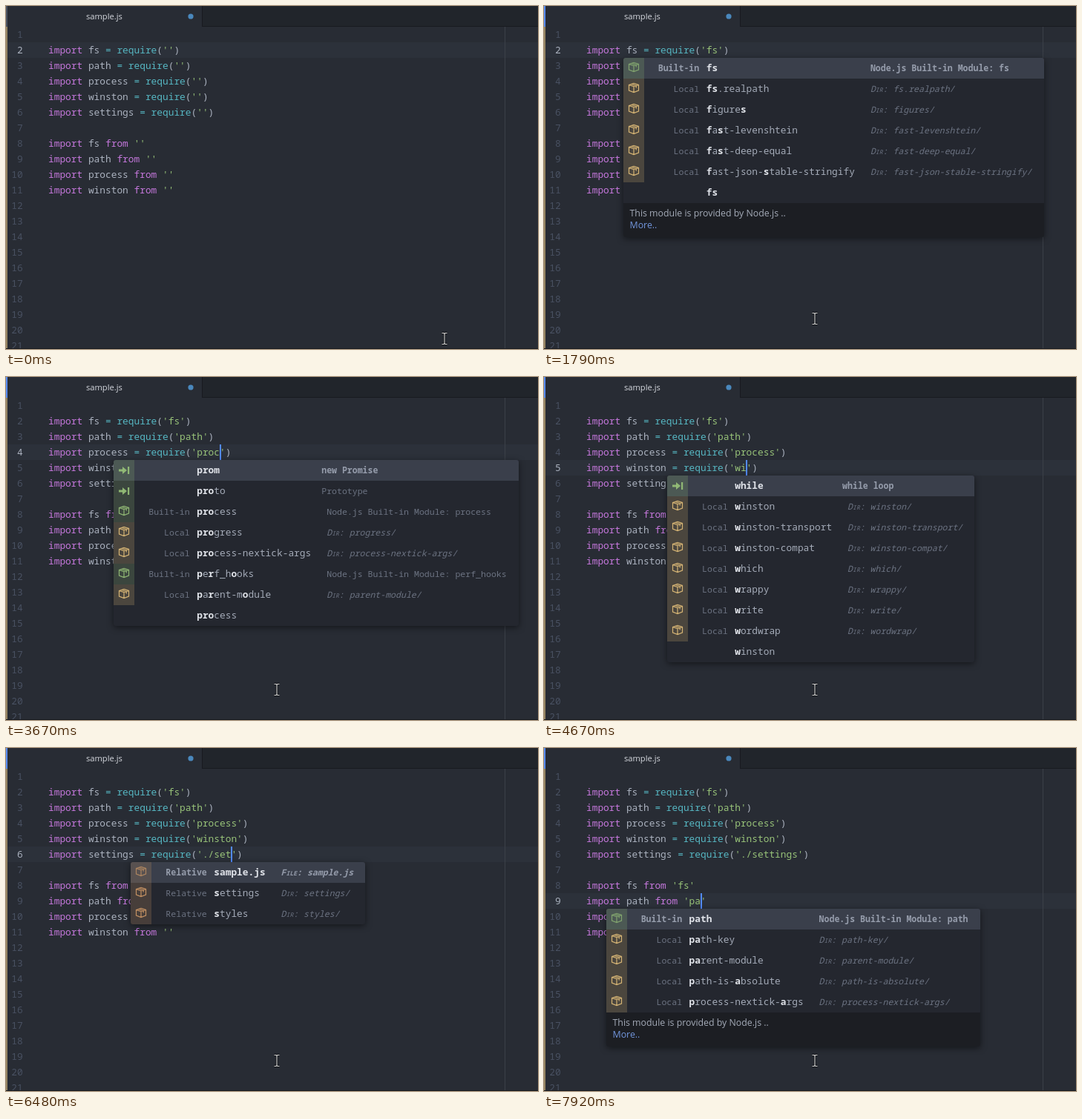
Write an HTML page with a canvas that moves like this. It is 717 px wide and 463 px high and loops after 8 s.

```html
<!DOCTYPE html>
<html lang="en">
<head>
<meta charset="utf-8">
<title>Editor autocomplete</title>
<style>
html, body { margin: 0; width: 100%; height: 100%; overflow: hidden; background: #282c34; }
canvas { display: block; }
</style>
</head>
<body>
<canvas id="stage" width="717" height="463"></canvas>
<script>
const ctx = document.getElementById('stage').getContext('2d');
const LOOP = 8000, CHAR = 7.7, SMALL = 6.93, LINE = 21, ROW = 28, CODE_X = 57;

const mono = (advance, style = '') => `${style} ${advance / 0.6}px "Noto Sans Mono", monospace`;
const sans = size => `${size}px "Open Sans", sans-serif`;

const modules = ['fs', 'path', 'process', 'winston', 'settings'];
const lineTop = n => 28 + (n - 1) * LINE;

// Each line: tokens before the quoted string, and what closes it
const code = {};
modules.forEach((name, i) => {
  code[i + 2] = {
    tokens: [['import ', '#c678dd'], [name + ' ', '#abb2bf'], ['= require', '#56b6c2'], ['(', '#abb2bf']],
    close: ')'
  };
  if (i < 4) code[i + 8] = {
    tokens: [['import ', '#c678dd'], [name + ' ', '#abb2bf'], ['from ', '#c678dd']],
    close: ''
  };
});
const stringStart = n => code[n].tokens.reduce((sum, [s]) => sum + s.length, 1);

// Suggestions: s snippet, b built-in, l local, r relative, w plain word
const suggestions = {
  'f': 's:f=Anonymous Function|s:fix=fixme|s:for=for|s:forin=for in|s:forof=for of|s:fun=Function|b:fs|l:fecha|l:flatted|l:figures|l:flat-cache',
  'fs': 'b:fs|l:fs.realpath|l:figures|l:fast-levenshtein|l:fast-deep-equal|l:fast-json-stable-stringify|w:fs',
  'p': 's:prom=new Promise|s:proto=Prototype|b:path|b:process|b:punycode|l:pump|l:pify|l:path-key|l:progress|l:path-exists|l:pinkie',
  'pa': 'b:path|l:path-key|l:parent-module|l:path-is-absolute|l:process-nextick-args',
  'pat': 'b:path|l:path-key|l:path-is-absolute|l:parent-module',
  'path': 'b:path|l:path-key|l:path-is-absolute',
  'pro': 's:prom=new Promise|s:proto=Prototype|b:process|l:progress|l:process-nextick-args|b:perf_hooks|l:parent-module|w:process',
  'proc': 'b:process|l:process-nextick-args|w:process',
  'w': 's:while=while loop|l:winston|l:winston-transport|l:winston-compat|l:which|l:wrappy|l:write|l:wordwrap|w:winston',
  'wi': 'l:winston|l:winston-transport|l:winston-compat|l:which|l:write|w:winston',
  'wins': 'l:winston|l:winston-transport|l:winston-compat|w:winston',
  '.': 'r:..',
  '/': 'r:modules|r:sample.js|r:settings|r:styles',
  's': 'r:sample.js|r:settings|r:styles',
  'set': 'r:settings|w:settings'
};
const descriptions = {
  b: ['This module is provided by Node.js ..', 'More..'],
  r: ['D:\\desarollo\\github\\tolverna\\atom-', 'path-intellisense\\assets']
};
const labels = { s: '', b: 'Built-in', l: 'Local', r: 'Relative', w: '' };
const tints = { s: '#98c379', b: '#98c379', l: '#e5c07b', r: '#d19a66' };

// time, line, typed string, open suggestion list
const steps = [
  [0, 2, ''], [1340, 2, 'f'], [1400, 2, 'f', 'f'], [1470, 2, 'fs', 'f'], [1540, 2, 'fs', 'fs'], [1950, 2, 'fs'],
  [2100, 3, ''], [2200, 3, 'p'], [2290, 3, 'p', 'p'], [2440, 3, 'pa', 'p'], [2500, 3, 'pa', 'pa'],
  [2580, 3, 'pat', 'pat'], [2750, 3, 'path', 'pat'], [2820, 3, 'path', 'path'], [3000, 3, 'path'],
  [3290, 4, ''], [3360, 4, 'p'], [3440, 4, 'pr', 'p'], [3670, 4, 'proc', 'pro'], [3820, 4, 'proc', 'proc'],
  [3980, 4, 'process'],
  [4360, 5, ''], [4440, 5, 'w'], [4520, 5, 'w', 'w'], [4670, 5, 'wi', 'w'], [4740, 5, 'win', 'wi'],
  [4820, 5, 'wins', 'wi'], [4900, 5, 'wins', 'wins'], [5300, 5, 'winston'],
  [5540, 6, ''], [5610, 6, '.'], [5680, 6, '.', '.'], [5910, 6, './', '/'], [6150, 6, './s', '/'],
  [6230, 6, './s', 's'], [6310, 6, './se', 's'], [6480, 6, './set', 's'], [6540, 6, './set', 'set'],
  [6920, 6, './settings'],
  [6990, 8, ''], [7070, 8, 'f', 'f'], [7150, 8, 'fs', 'fs'], [7340, 8, 'fs'],
  [7720, 9, ''], [7780, 9, 'p'], [7850, 9, 'p', 'p'], [7920, 9, 'pa', 'pa']
];
const blinks = [[1790, 1950], [5150, 5300], [6710, 6920]];
const mousePath = [
  [70, 591, 449], [240, 520, 350], [440, 350, 190], [640, 228, 88], [750, 199, 62], [840, 218, 57],
  [1090, 218, 57], [1200, 262, 160], [1320, 335, 350], [1450, 365, 422]
];

function rect(x, y, w, h, color) {
  ctx.fillStyle = color;
  ctx.fillRect(x, y, w, h);
}

function text(str, x, y, color, font) {
  ctx.font = font;
  ctx.fillStyle = color;
  ctx.fillText(str, x, y);
}

function stroke(points, color, width) {
  ctx.beginPath();
  points.forEach(line => line.forEach(([x, y], i) => i ? ctx.lineTo(x, y) : ctx.moveTo(x, y)));
  ctx.strokeStyle = color;
  ctx.lineWidth = width;
  ctx.stroke();
}

function polygon(points, color) {
  ctx.beginPath();
  points.forEach(([x, y]) => ctx.lineTo(x, y));
  ctx.closePath();
  ctx.fillStyle = color;
  ctx.fill();
}

function drawFrame(focused) {
  rect(0, 0, 717, 463, '#282c34');
  rect(264, 0, 453, 27, '#21252b');
  rect(264, 0, 1, 28, '#181a1f');
  rect(264, 27, 453, 1, '#181a1f');
  rect(0, 0, 2, 28, focused ? '#568af2' : '#4b5260');
  text('sample.js', 108, 18, '#d7dae0', sans(11.15));
  ctx.beginPath();
  ctx.arc(249, 14, 3.6, 0, 7);
  ctx.fillStyle = '#4a88bd';
  ctx.fill();
}

function drawCode(activeLine, strings) {
  rect(2, lineTop(activeLine), 715, LINE, '#2c313a');
  rect(672, 28, 1, 435, '#3b4048');
  rect(0, 28, 2, 435, '#948360');
  for (let n = 1; n <= 21; n++) {
    const y = lineTop(n) + 15, num = String(n);
    text(num, 22.6 - num.length * CHAR, y, n === activeLine ? '#abb2bf' : '#495162', mono(CHAR));
    if (!code[n]) continue;
    let x = CODE_X;
    const quoted = `'${strings[n] || ''}'`;
    for (const [str, color] of [...code[n].tokens, [quoted, '#98c379'], [code[n].close, '#abb2bf']]) {
      text(str, x, y, color, mono(CHAR));
      x += str.length * CHAR;
    }
  }
  rect(0, 462, 717, 1, '#181a1f');
}

function drawIcon(type, x, y) {
  const color = tints[type];
  if (type === 's') {
    rect(x - 7, y - 1.5, 6, 3, color);
    polygon([[x - 2, y - 5], [x + 4, y], [x - 2, y + 5]], color);
    rect(x + 5, y - 5, 2.2, 10, color);
    return;
  }
  stroke([
    [[x - 6.5, y - 4], [x, y - 6], [x + 6.5, y - 4], [x + 6.5, y + 3.5], [x, y + 6], [x - 6.5, y + 3.5], [x - 6.5, y - 4], [x, y - 2], [x + 6.5, y - 4]],
    [[x, y - 2], [x, y + 6]],
    [[x - 3.2, y - 5], [x + 3.2, y - 3], [x + 3.2, y]]
  ], color, 1.2);
}

// Indexes of matched letters; a letter that starts a later word wins
function matches(word, query) {
  const found = new Set();
  let from = 0;
  for (const ch of query) {
    const wordStart = word.indexOf('-' + ch, from);
    const at = wordStart >= 0 ? wordStart + 1 : word.indexOf(ch, from);
    if (at < 0) break;
    found.add(at);
    from = at + 1;
  }
  return found;
}

function parse(entry) {
  const type = entry[0], [word, note] = entry.slice(2).split('=');
  const file = /\w\./.test(word);
  const kind = type === 'r' && file ? 'File' : type === 'l' || type === 'r' ? 'Dir' : '';
  const detail = type === 's' ? note : type === 'b' ? 'Node.js Built-in Module: ' + word
    : kind ? ': ' + word + (kind === 'Dir' ? '/' : '') : '';
  const kindWidth = kind && SMALL * (1 + 0.7 * (kind.length - 1));
  return { type, word, kind, detail, kindWidth, width: detail.length * SMALL + (kindWidth || 0) };
}

function drawDetail(row, x, y, color, weight) {
  if (row.kind) {
    const style = 'italic ' + weight;
    text(row.kind[0], x, y, color, mono(SMALL, style));
    text(row.kind.slice(1).toUpperCase(), x + SMALL, y, color, mono(SMALL * 0.7, style));
    text(row.detail, x + row.kindWidth, y, color, mono(SMALL, style));
  } else text(row.detail, x, y, color, mono(SMALL, weight));
}

function drawPopup(key, wordX, top) {
  const rows = suggestions[key].split('|').map(parse);
  const max = fn => Math.max(...rows.map(fn));
  const scrolls = rows.length > 10;
  const detailX = wordX + max(r => r.word.length) * CHAR + 21;
  let offset = 56.6 + max(r => labels[r.type].length) * SMALL;
  const natural = detailX - wordX + offset + max(r => r.width) + 16;
  offset += Math.max(0, 243 - natural) * 0.55;
  const left = Math.round(wordX - offset);
  const width = Math.round(Math.max(243, natural)) + (scrolls ? 12 : 0);
  const listHeight = Math.min(rows.length, 10) * ROW;
  const about = rows[0].type === 'b' || key === '.' ? descriptions[rows[0].type] : null;
  const aboutHeight = about ? (key === '.' ? 42 : 46) : 0;

  ctx.save();
  ctx.shadowColor = 'rgba(0,0,0,.5)';
  ctx.shadowBlur = 8;
  ctx.shadowOffsetY = 2;
  ctx.beginPath();
  ctx.roundRect(left, top, width, listHeight + aboutHeight, 3);
  ctx.fillStyle = '#24272f';
  ctx.fill();
  ctx.restore();

  ctx.save();
  ctx.clip();
  rows.slice(0, 10).forEach((row, i) => {
    const y = top + i * ROW, base = y + 18, selected = i === 0;
    const weight = selected ? 'bold' : '', color = selected ? '#959cab' : '#6c7382';
    if (selected) rect(left, y, width - (scrolls ? 12 : 0), ROW, '#3a3f4b');
    if (tints[row.type]) {
      ctx.globalAlpha = 0.2;
      rect(left, y, 28, ROW, tints[row.type]);
      ctx.globalAlpha = selected && row.type !== 's' ? 0.7 : 0.9;
      drawIcon(row.type, left + 14, y + (row.type === 's' ? 14 : 12.5));
      ctx.globalAlpha = 1;
    }
    const label = labels[row.type];
    text(label, wordX - 9.5 - label.length * SMALL, base, color, mono(SMALL, weight));
    const hits = matches(row.word, key);
    [...row.word].forEach((ch, j) => {
      const hit = hits.has(j);
      text(ch, wordX + j * CHAR, base, hit || selected ? '#e0e3e9' : '#a4abb8', mono(CHAR, hit || selected ? 'bold' : ''));
    });
    drawDetail(row, detailX - (row.type === 's' ? 7 : 0), base, color, weight);
  });
  if (scrolls) rect(left + width - 10, top + 2, 5, 250, '#4b5362');
  if (about) {
    const y = top + listHeight;
    rect(left, y, width, aboutHeight, '#1c1e23');
    about.forEach((str, i) =>
      text(str, left + 8.5, y + 18 + i * 16, str === 'More..' ? '#7296dd' : '#a4abb8', sans(12.35)));
  }
  ctx.restore();
}

function mouseAt(t) {
  const next = mousePath.findIndex(p => p[0] > t);
  if (next === 0) return mousePath[0].slice(1);
  if (next < 0) return mousePath[mousePath.length - 1].slice(1);
  const [t0, x0, y0] = mousePath[next - 1], [t1, x1, y1] = mousePath[next];
  const k = (t - t0) / (t1 - t0);
  return [x0 + (x1 - x0) * k, y0 + (y1 - y0) * k];
}

function drawMouse(t) {
  const [x, y] = mouseAt(t);
  if (t >= 1010 && t < 1170) {
    ctx.beginPath();
    ctx.arc(x, y, 12, 0, 7);
    ctx.fillStyle = 'rgba(190,180,20,.8)';
    ctx.fill();
  }
  if (t >= 7070 && t < 7920) {
    const tip = [[0, 0], [0, 16], [3.7, 12.5], [6.2, 18], [8.6, 17], [6.2, 11.5], [11, 11.3]].map(([a, b]) => [x + a, y + b]);
    polygon(tip, '#e8e8e8');
    stroke([[...tip, tip[0]]], '#15171b', 0.8);
    return;
  }
  const beam = [
    [[x - 3.5, y - 7.5], [x - 1, y - 7.5], [x, y - 6.5], [x + 1, y - 7.5], [x + 3.5, y - 7.5]],
    [[x, y - 6.5], [x, y + 6.5]],
    [[x - 3.5, y + 7.5], [x - 1, y + 7.5], [x, y + 6.5], [x + 1, y + 7.5], [x + 3.5, y + 7.5]]
  ];
  stroke(beam, '#101216', 3);
  stroke(beam, '#d8d8d8', 1.1);
}

function draw(t) {
  const strings = {};
  let now;
  for (const step of steps) {
    if (step[0] > t) break;
    now = step;
    strings[step[1]] = step[2];
  }
  const [, line, typed, popup] = now, focused = t >= 1090;
  drawFrame(focused);
  drawCode(line, strings);
  const startX = CODE_X + stringStart(line) * CHAR;
  if (focused && !blinks.some(([on, off]) => t >= on && t < off))
    rect(Math.round(startX + typed.length * CHAR - 0.3), lineTop(line), 2, LINE, '#528bff');
  if (popup) drawPopup(popup, startX + (typed.startsWith('./') ? 2 * CHAR : 0), lineTop(line + 1));
  drawMouse(t);
}

function tick() {
  draw(performance.now() % LOOP);
  requestAnimationFrame(tick);
}
tick();
</script>
</body>
</html>
```
